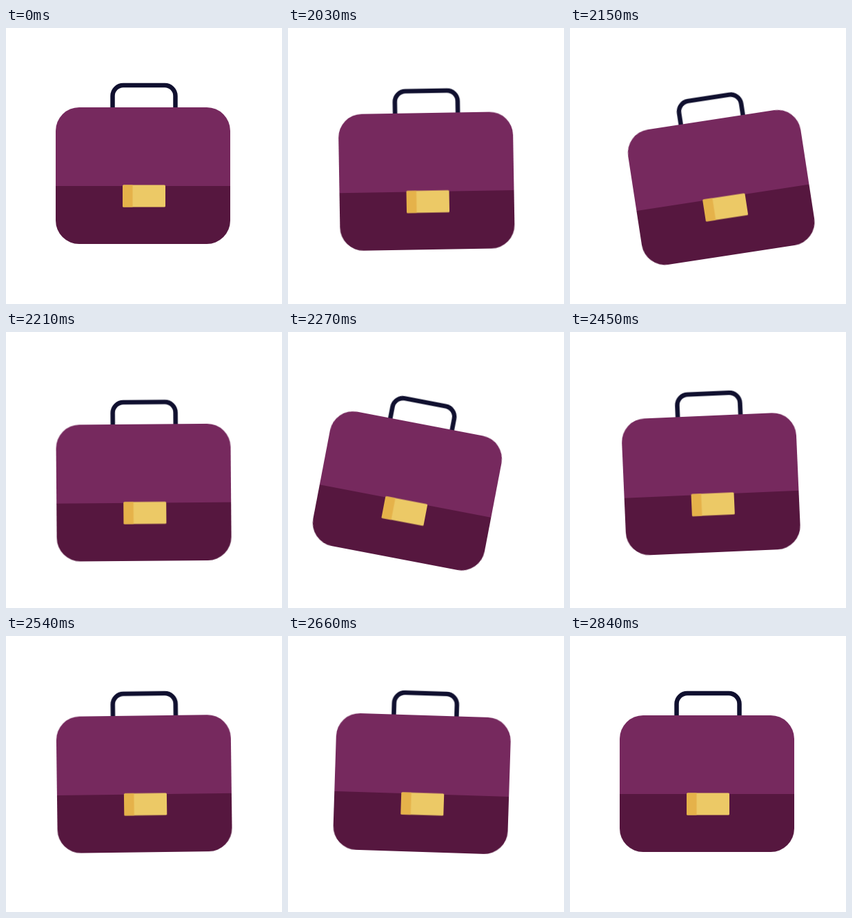
Write an HTML page without scripts that moves like this. It is 400 px wide and 400 px high and loops after 2870 ms.

```html
<!DOCTYPE html>
<html lang="en">
<head>
<meta charset="utf-8">
<title>Briefcase</title>
<style>
  html, body { margin: 0; width: 100%; height: 100%; overflow: hidden; background: #fff; }
  svg { display: block; width: 100%; height: 100%; }

  .drop, .swing {
    animation: drop 2870ms infinite both;
    --sine: cubic-bezier(.37, 0, .63, 1);
    animation-timing-function: var(--sine);
  }
  .swing { animation-name: swing; transform-origin: 199px 78px; }

  /* rest until 2030 ms, then a sudden dip and a slower return */
  @keyframes drop {
    0%, 70.73% { transform: translateY(0); }
    70.732% { transform: translateY(8px); animation-timing-function: cubic-bezier(.3, .5, .5, 1); }
    74.913% { transform: translateY(18.5px); }
    79.094% { transform: translateY(18.8px); }
    89.547%, 100% { transform: translateY(0); }
  }

  /* damped swing around the handle */
  @keyframes swing {
    0%, 70.73% { transform: rotate(0deg); }
    70.732% { transform: rotate(-.9deg); animation-timing-function: cubic-bezier(.35, .3, .6, 1); }
    75.087% { transform: rotate(-8.75deg); }
    79.443% { transform: rotate(11.1deg); }
    86.237% { transform: rotate(-3deg); }
    91.115% { transform: rotate(2deg); }
    99.303%, 100% { transform: rotate(0deg); }
  }
</style>
</head>
<body>
<svg viewBox="0 0 400 400">
  <defs>
    <clipPath id="clasp"><rect x="169" y="227.5" width="62" height="32" rx="1.5"/></clipPath>
  </defs>
  <g class="drop">
    <g class="swing">
      <path d="M154.5 118V98.500a15.500 15.500 0 0 1 15.500-15.500H230a15.500 15.500 0 0 1 15.500 15.500V118" fill="none" stroke="#10102f" stroke-width="6.500"/>
      <path d="M72 230V149a34 34 0 0 1 34-34H291a34 34 0 0 1 34 34V230Z" fill="#76295e"/>
      <path d="M72 229H325V279a34 34 0 0 1-34 34H106a34 34 0 0 1-34-34Z" fill="#56173f"/>
      <g clip-path="url(#clasp)">
        <rect x="168" y="227" width="64" height="33" fill="#ecc966"/>
        <rect x="168" y="227" width="15.500" height="33" fill="#e5b24a"/>
      </g>
    </g>
  </g>
</svg>
</body>
</html>
```
